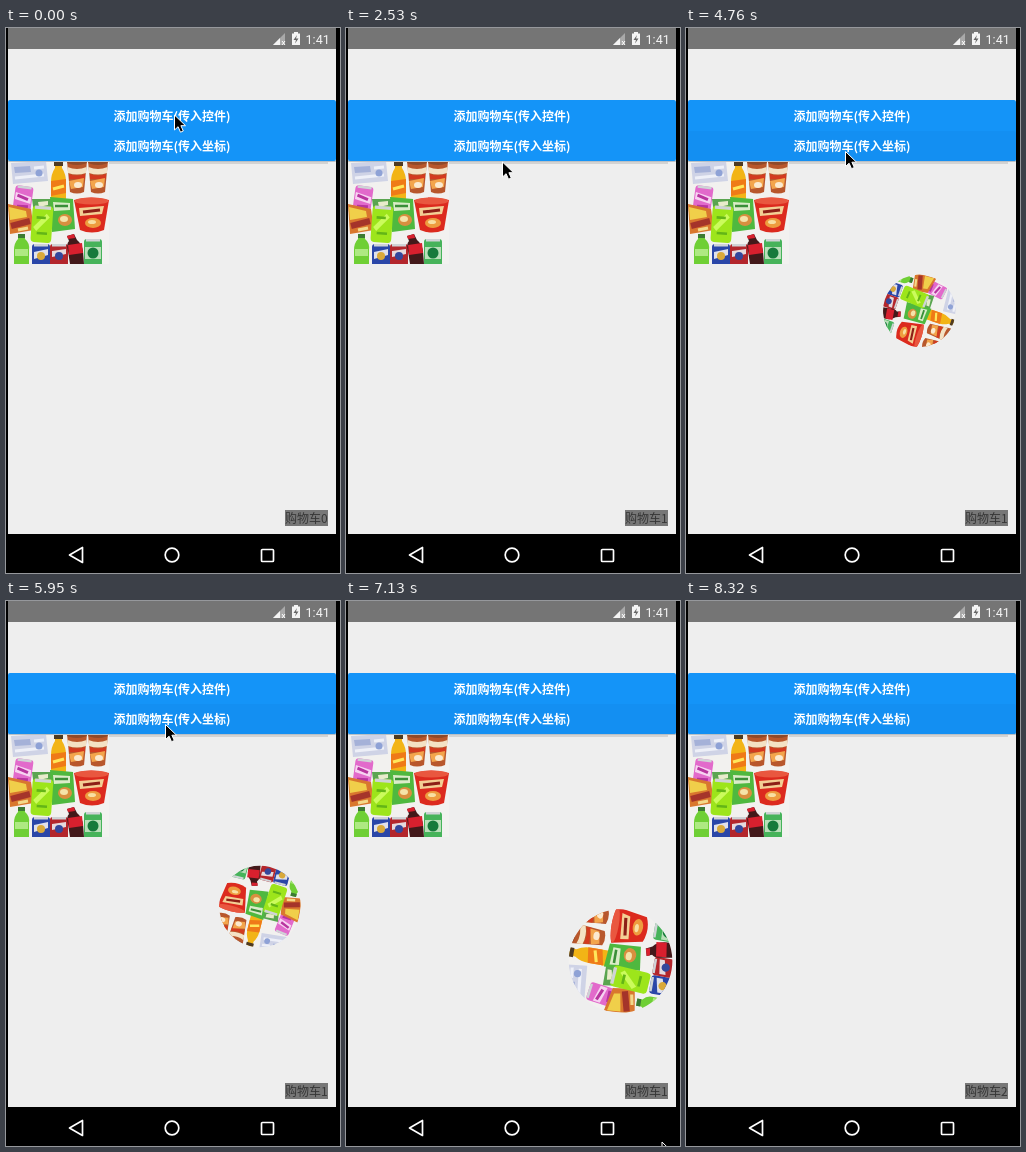
Recreate the animation shown at these times as an HTML page. Size 334x545 px, loop 8470 ms.

```html
<!DOCTYPE html>
<html lang="zh">
<head>
<meta charset="utf-8">
<title>添加购物车</title>
<style>
html, body { margin: 0; width: 100%; height: 100%; overflow: hidden; background: #000; }
svg { display: block; }
text { font-family: "Noto Sans CJK SC", "Noto Sans CJK", sans-serif; font-size: 12px; }
.btn { fill: #fff; font-weight: 700; text-anchor: middle; }
.clock { font: 12.6px Roboto, sans-serif; fill: #f4f4f4; }
.nav { fill: none; stroke: #fff; stroke-width: 1.7; stroke-linejoin: round; }
</style>
</head>
<body>
<svg width="334" height="545" viewBox="0 0 334 545">
  <defs>
    <clipPath id="screen"><rect x="2" y="21" width="328" height="485"/></clipPath>
    <clipPath id="round"><circle r="50"/></clipPath>
    <clipPath id="photo"><rect x="-50" y="-51" width="101" height="103"/></clipPath>
    <g id="cup">
      <path d="M-10-16H10L7 15Q0 18-7 15Z" fill="#b8572c"/>
      <ellipse cy="-15" rx="10" ry="3" fill="#8f4a2a"/>
      <path d="M-9.500-10Q0-6 9.500-10L9-4Q0-1-9-4Z" fill="#f4e2c4"/>
      <path d="M-8-3Q0 0 8-3L8 2H-8Z" fill="#d33a1f"/>
      <path d="M-8 4L7 1L6 10L-6 12Z" fill="#f3a54c"/>
      <ellipse cx="1" cy="8" rx="4" ry="3" fill="#fbe9cf"/>
    </g>
    <g id="can">
      <rect x="-9" y="-13" width="18" height="28" rx="3"/>
      <rect x="-7" y="-13" width="14" height="2.500" fill="#cfd3d6"/>
    </g>
    <g id="goods" clip-path="url(#photo)">
      <rect x="-50" y="-51" width="101" height="103" fill="#f2f1ef"/>
      <path d="M-47-49L-12-51L-10-31L-45-28Z" fill="#cfd3e6"/>
      <path d="M-44-45L-28-46L-27-40L-43-39Z" fill="#a5b1d8"/>
      <path d="M-43-34L-14-37M-24-44L-14-45" stroke="#eef0f8" stroke-width="3"/>
      <circle cx="-19" cy="-39" r="3.500" fill="#8fa2d6"/>
      <use href="#cup" x="19" y="-35"/>
      <use href="#cup" x="40" y="-35"/>
      <path d="M-3-51H4V-44Q8-38 8-30V-6Q1-2-7-6V-30Q-7-38-3-44Z" fill="#f2b416"/>
      <rect x="-4" y="-51" width="9" height="5" fill="#4e3a22"/>
      <path d="M-7-31L8-33V-19L-7-16Z" fill="#ef7a18"/>
      <path d="M-5-23L6-26" stroke="#ffe65a" stroke-width="3"/>
      <path d="M-6-10H7" stroke="#e89510" stroke-width="4"/>
      <g transform="translate(-35 -13) rotate(8)">
        <use href="#can" fill="#e26acb"/>
        <path d="M-8-6L8-3V4L-8 1Z" fill="#f7d3f1"/>
        <path d="M-6-3L5 0M-5 8L6 7" stroke="#b8349f" stroke-width="3"/>
      </g>
      <path d="M-50-8L-27-3L-24 18L-48 22Z" fill="#d9772e"/>
      <path d="M-49-5L-32-1L-31 5L-48 8Z" fill="#f0cf4a"/>
      <path d="M-47 14L-28 9" stroke="#a5342a" stroke-width="6"/>
      <path d="M-40 18L-30 16" stroke="#f3d98a" stroke-width="3"/>
      <path d="M-26-13L-7-13L-6-4L-24 1Z" fill="#5aa550"/>
      <path d="M-20-10L-10-11L-10-7L-19-5Z" fill="#e8eccb"/>
      <path d="M-8-15L15-13L17 17L-6 20Z" fill="#4fb83f"/>
      <path d="M-5-10L12-9L12-2L-4-1Z" fill="#dcecc9"/>
      <path d="M-3-6H10" stroke="#3b8f38" stroke-width="2.500"/>
      <ellipse cx="7" cy="8" rx="7" ry="6" fill="#d98f3f"/>
      <ellipse cx="6" cy="7" rx="4" ry="3" fill="#f5e3a8"/>
      <g transform="translate(-16 11) rotate(4) scale(1.150 1.300)">
        <use href="#can" fill="#9de51b"/>
        <path d="M-6 5L5-6" stroke="#cbfb5c" stroke-width="4"/>
        <path d="M-5-4H3M-4 8H5" stroke="#63b517" stroke-width="2"/>
      </g>
      <path d="M16-12Q33-17 51-12L46 18Q34 23 22 18Z" fill="#dc2a1e"/>
      <ellipse cx="33.500" cy="-11" rx="17" ry="3.500" fill="#e9573f"/>
      <path d="M21-4L46-6L44 2L22 4Z" fill="#f3cf94"/>
      <path d="M25 0L42-2" stroke="#8d1f17" stroke-width="3"/>
      <ellipse cx="35" cy="11" rx="8" ry="5" fill="#ee9c3e"/>
      <ellipse cx="34" cy="10" rx="4" ry="2" fill="#f8dfa2"/>
      <path d="M-40 22H-33V27Q-28 31-29 38V52H-44V38Q-44 31-40 27Z" fill="#6fcf35"/>
      <rect x="-40" y="22" width="7" height="4" fill="#3c7a34"/>
      <path d="M-43 37H-30V44H-43Z" fill="#aee982"/>
      <use href="#can" x="-17" y="45" fill="#2a46a8"/>
      <path d="M-24 40L-10 37V43L-24 47Z" fill="#dfe0ea"/>
      <circle cx="-17" cy="44" r="4" fill="#d9a93a"/>
      <use href="#can" x="1" y="45" fill="#b3262c"/>
      <path d="M-6 39L8 37V42L-6 45Z" fill="#e6d9dc"/>
      <circle cx="1" cy="44" r="4" fill="#33479c"/>
      <path d="M9 24L16 22L19 28Q24 32 25 39L26 52H12L10 39Q8 32 11 29Z" fill="#43191a"/>
      <path d="M10 33L24 31L25 41L11 43Z" fill="#d8202e"/>
      <path d="M9 24L16 22L17 26L10 27Z" fill="#d8202e"/>
      <use href="#can" x="35" y="40" fill="#46b35a"/>
      <path d="M27 35H43V47H27Z" fill="#b9dfb9"/>
      <circle cx="35" cy="41" r="5.500" fill="#167a3b"/>
    </g>
  </defs>

  <rect width="334" height="545" fill="#000"/>
  <rect x="2" width="328" height="21" fill="#757575"/>
  <rect x="2" y="21" width="328" height="485" fill="#eee"/>

  <path d="M279 5V17H267Z" fill="#a9a9a9"/>
  <path d="M274 10V17H267Z" fill="#f4f4f4"/>
  <path d="M276 13L279 17M279 13L276 17" stroke="#fff"/>
  <path d="M288 4H292V5.500H294V17H286V5.500H288Z" fill="#f4f4f4"/>
  <path d="M291 7L287.500 12H290L289 15.500L292.500 10.500H290Z" fill="#666"/>
  <text class="clock" x="299.500" y="15.500">1:41</text>

  <use href="#goods" x="52" y="184"/>
  <rect x="103" y="133" width="219" height="3" fill="#d3d3d3"/>
  <rect x="2" y="132" width="328" height="2" rx="1" fill="#b9c0c6"/>
  <rect x="2" y="72" width="328" height="61" rx="2" fill="#1494f8"/>
  <rect id="press" x="2" y="103" width="328" height="30" rx="2" fill="#138ff2"/>
  <text class="btn" x="166" y="92.500">添加购物车(传入控件)</text>
  <text class="btn" x="166" y="122.500">添加购物车(传入坐标)</text>

  <rect x="279" y="482" width="43" height="16" fill="#777"/>
  <text id="cart" x="279" y="495" fill="#363636">购物车0</text>

  <g clip-path="url(#screen)">
    <g id="ball"><g clip-path="url(#round)"><use href="#goods"/></g></g>
  </g>

  <g class="nav">
    <path d="M63.500 527L76.500 519.500V534.500Z"/>
    <circle cx="166" cy="527" r="6.800"/>
    <rect x="255.500" y="521.500" width="12" height="12" rx="1"/>
  </g>
  <path id="cursor" d="M0 0V15L3.600 11.700L6 17.200L8.800 16L6.400 10.700H11Z" fill="#000" stroke="#fff"/>
</svg>
<script>
const LOOP = 8470, HOLD = 1050, STEP = 148.4;
const get = id => document.getElementById(id);
const ball = get('ball'), cart = get('cart'), cursor = get('cursor'), press = get('press');
const lerp = (a, b, u) => a + (b - a) * u;

const flights = [
  { start: 1050, length: 1000, x: 58, y: 186 },
  { start: 3250, length: 5000, x: 207, y: 278 }
];
const END = { x: 294, y: 453 };

// time, x, y of the pointer tip
const pointer = [
  [0, 168.5, 87], [2500, 156.5, 134], [2650, 158, 143], [2800, 159, 131],
  [2950, 159.500, 123.500], [6500, 161, 131], [6650, 186, 190], [6800, 238, 320],
  [6950, 290, 460], [7100, 316, 541], [7250, 334, 560]
];

function place(t) {
  const f = flights.find(f => t >= f.start && t < f.start + f.length);
  ball.style.display = f ? '' : 'none';
  if (f) {
    const u = (t - f.start) / f.length, e = u ** 3;
    const x = lerp(f.x, END.x, u), y = lerp(f.y, END.y, e);
    ball.setAttribute('transform',
      `translate(${x} ${y}) rotate(${360 * u}) scale(${0.705 * (1 + e)})`);
  }
  const count = flights.filter(f => t >= f.start + f.length).length;
  cart.textContent = '购物车' + count;
  press.style.display = t >= 3250 ? '' : 'none';
  const [, px, py] = pointer.filter(p => t >= p[0]).pop();
  cursor.setAttribute('transform', `translate(${px} ${py})`);
}

function draw() {
  const t = performance.now() % LOOP;
  place(t < HOLD ? 0 : HOLD + STEP * Math.floor((t - HOLD) / STEP + 0.1));
  requestAnimationFrame(draw);
}
draw();
</script>
</body>
</html>
```
